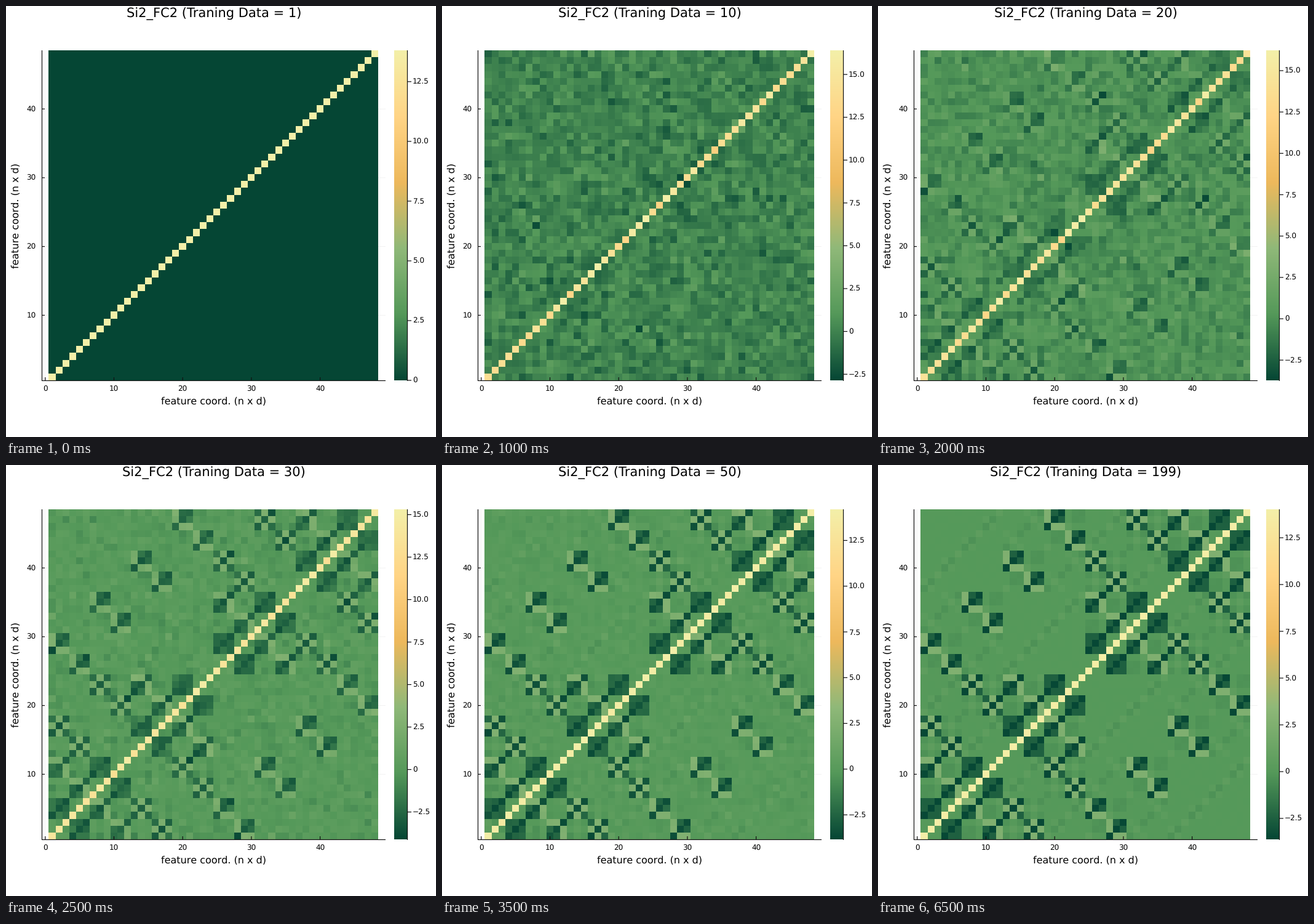
These frames come from a looping animation (699x700 px, 7000 ms). A matplotlib script:

```python
import math
from itertools import combinations

import matplotlib.pyplot as plt
import numpy as np
from matplotlib.animation import FuncAnimation
from matplotlib.colors import LinearSegmentedColormap

W, H, DPI = 699, 700, 100
PX = 72 / DPI
TOP, BOTTOM = 72, 608
ATOMS = 16
SIZE = 3 * ATOMS
INK = "#111111"
COUNTS = [1, 5, 10, 15, 20, 30, 40, 50, 60, 80, 100, 125, 150, 199]

# Key points of the colour range against the sample count
KEY_COUNTS = [1, 5, 15, 30, 50, 100, 199]
KEY_LOWS = [0, -1.84, -3.45, -4.11, -3.84, -3.68, -3.62]
KEY_HIGHS = [13.81, 15.6, 16.88, 15.31, 14.2, 14.08, 14.02]

plt.rcParams.update({"font.family": "DejaVu Sans", "text.hinting": "none",
                     "text.hinting_factor": 1})
CMAP = LinearSegmentedColormap.from_list(
    "field",
    ["#054634", "#549859", "#8fb878", "#edb85c", "#ffd485", "#f3efa8"],
    N=512,
)


def color_range(n):
    return [np.interp(math.log(n), np.log(KEY_COUNTS), keys)
            for keys in (KEY_LOWS, KEY_HIGHS)]


def signal_share(n):
    return 0 if n == 1 else 1 / (1 + (17.5 / n) ** 3.5)


def noise_level(n):
    return 0.95 * math.sqrt(1 - signal_share(n)) * (1 - math.exp((1 - n) / 5))


def near_block(d):
    return -2.5 * np.outer(d, d) - np.eye(3)


def far_block(d):
    return 0.5 * np.eye(3) - 0.55 * np.diag(d * d) - 0.3 * np.outer(d, d)


def build_signal():
    """Neighbours differ by a fixed bit mask of the atom index."""
    bonds = {1: np.ones(3)}
    for axis in range(3):
        bonds[1 ^ (2 << axis)] = 2 * np.eye(3)[2 - axis] - 1
    blocks = {mask: near_block(d) for mask, d in bonds.items()}
    for (p, dp), (q, dq) in combinations(bonds.items(), 2):
        blocks[p ^ q] = far_block((dp - dq) / 2)
    out = np.zeros((SIZE, SIZE))
    for a in range(ATOMS):
        for mask, block in blocks.items():
            b = a ^ mask
            out[3 * b:3 * b + 3, 3 * a:3 * a + 3] = block
    return out


def symmetric_noise(rng):
    upper = np.triu(rng.normal(size=(SIZE, SIZE)))
    return upper + np.triu(upper, 1).T


def build_matrices():
    rng = np.random.default_rng(12)
    signal = build_signal()
    noise = symmetric_noise(rng)
    result = []
    for n in COUNTS:
        level = noise_level(n)
        m = signal_share(n) * signal + level * noise
        np.fill_diagonal(m, 13.82 + level * (0.7 + 1.3 * np.diag(noise)))
        result.append(m)
        noise = 0.75 * noise + 0.66 * symmetric_noise(rng)
    return result


def pixel_edges(start, stop, count):
    return np.floor(np.linspace(start, stop, count + 1) + 0.5)


MATRICES = build_matrices()

fig = plt.figure(figsize=(W / DPI, H / DPI), dpi=DPI, facecolor="white")
ax = fig.add_axes((0, 0, 1, 1))
ax.set_xlim(0, W)
ax.set_ylim(H, 0)
ax.axis("off")


def line(x0, y0, x1, y1, width=1.2, color=INK, z=4):
    return ax.plot([x0, x1], [y0, y1], color=color, lw=width * PX, zorder=z,
                   solid_capstyle="butt", snap=False)[0]


def label(x, y, text, px, ha="center", **kw):
    return ax.text(x, y, text, fontsize=px * PX, ha=ha, va="baseline",
                   color="black", **kw)


def mesh(xs, ys, values):
    return ax.pcolormesh(xs, ys, values, cmap=CMAP, antialiased=False,
                         edgecolors="none", zorder=2)


heat = mesh(pixel_edges(69.38, 604.98, SIZE),
            pixel_edges(BOTTOM, TOP, SIZE), MATRICES[0])
bar_height = BOTTOM - TOP
mesh([631, 652], pixel_edges(BOTTOM, TOP, bar_height),
     np.linspace(0, 1, bar_height)[:, None])

# Axes, grid and fixed labels
for v in range(0, 50, 10):
    x = 63.8 + v * 11.17
    line(x, TOP, x, BOTTOM, 0.8, "#f0f0f0", 1)
    line(x, BOTTOM, x, BOTTOM - 5)
    label(x, 626, str(v), 11.7)
    if v:
        y = 614 - v * 11.17
        line(58, y, 617, y, 0.8, "#f0f0f0", 1)
        line(58, y, 63, y)
        label(48.5, y + 4.3, str(v), 11.7, "right")
line(58.5, TOP, 58.5, 609)
line(58, 608.5, 617, 608.5)
line(652.5, TOP, 652.5, 609)
label(338, 646.5, "feature coord. (n x d)", 16.1)
label(20.5, 340, "feature coord. (n x d)", 16.1, rotation=90,
      rotation_mode="anchor")
title = label(338, 18, "", 20.7)

bar_ticks = [(line(652, 0, 659, 0), label(661, 0, "", 11.7, "left"))
             for _ in range(9)]


def draw(i):
    n = COUNTS[i]
    low, high = color_range(n)
    heat.set_array(MATRICES[i])
    heat.set_clim(low, high)
    title.set_text(f"Si2_FC2 (Traning Data = {n})")
    first = math.ceil(low / 2.5)
    for k, (mark, text) in enumerate(bar_ticks):
        v = (first + k) * 2.5
        shown = v <= high
        mark.set_visible(shown)
        text.set_visible(shown)
        if shown:
            y = BOTTOM - (v - low) / (high - low) * bar_height
            mark.set_ydata([y, y])
            text.set_y(y + 4.3)
            text.set_text(f"{v:.1f}".replace("-", "\u2212") if v else "0")
    return [heat, title]


anim = FuncAnimation(fig, draw, frames=len(COUNTS), interval=500, repeat=True,
                     repeat_delay=0, blit=False)
plt.show()
```
